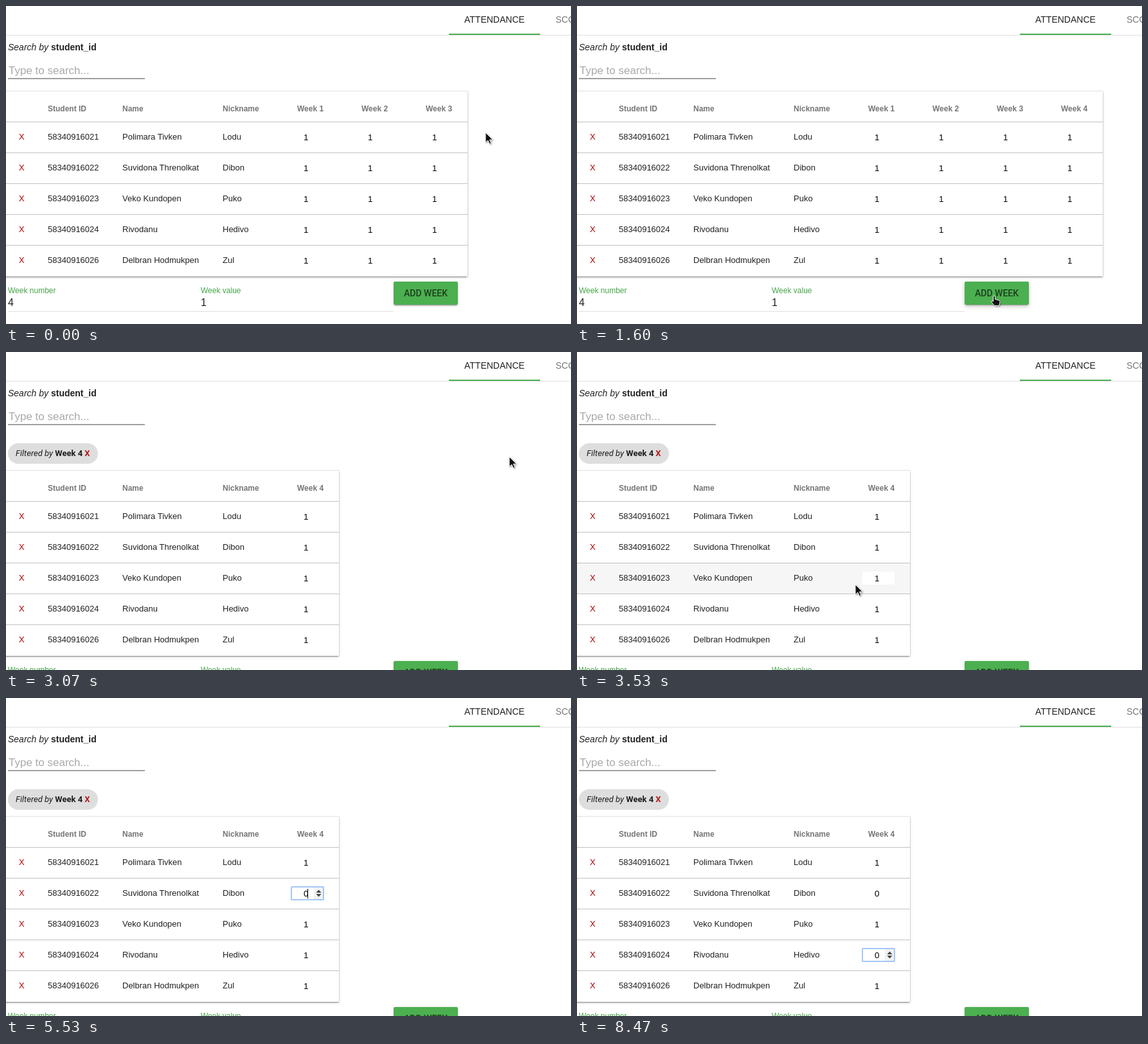
Write an HTML page that moves like this. It is 879x495 px and loops after 8.74 s.

```html
<!DOCTYPE html>
<html>
<head>
<meta charset="utf-8">
<title>Attendance</title>
<style>
html, body { margin: 0; height: 100%; overflow: hidden; background: #fff; }
#stage { position: relative; width: 100%; height: 100%; overflow: hidden; contain: strict; }
#card, #button, svg { position: absolute; }
#card {
  left: -10px; height: 288px; background: #fff;
  box-shadow: 0 0 0 1px rgba(0,0,0,.08), 0 3px 1px -2px rgba(0,0,0,.2),
    0 2px 2px rgba(0,0,0,.14), 0 1px 5px rgba(0,0,0,.12);
}
#button { left: 603px; width: 100px; height: 36px; border-radius: 2px; background: #4caf50; }
svg { left: 0; top: 0; font-family: "Liberation Sans", Arial, sans-serif; fill: rgba(0,0,0,.87); }
.tab { font-size: 14px; }
.muted { fill: rgba(0,0,0,.54); }
.hint { font-size: 17px; fill: #a9a9a9; }
.head { font-size: 12px; font-weight: bold; fill: #757575; }
.cell { font-size: 13px; }
.cross { font-size: 13px; fill: #b00000; }
.value { font-size: 13.33px; fill: #000; }
.picked { font-size: 13.33px; fill: #fff; }
.label { font-size: 12px; fill: #43a547; }
.field { font-size: 16px; }
.action { font: 500 14px Roboto, sans-serif; fill: rgba(0,0,0,.64); }
.chip { font: 13px Roboto, sans-serif; }
.i { font-style: italic; }
.b { font-weight: bold; }
.cursor { filter: drop-shadow(1px 1px 1px rgba(0,0,0,.4)); }
</style>
</head>
<body>
<div id="stage">
  <div id="card"></div>
  <div id="button"></div>
  <svg id="view" width="879" height="495"></svg>
</div>
<script>
const LOOP = 8740, PRESSED = 1470, ADDED = 1600, FILTERED = 3070, HIDDEN = 4660;
const FADE = 300, BLINK = 600;

const columns = { 'Student ID': 65, 'Name': 181, 'Nickname': 337 };
const students = [
  ['58340916021', 'Polimara Tivken', 'Lodu'],
  ['58340916022', 'Suvidona Threnolkat', 'Dibon'],
  ['58340916023', 'Veko Kundopen', 'Puko'],
  ['58340916024', 'Rivodanu', 'Hedivo'],
  ['58340916026', 'Delbran Hodmukpen', 'Zul']
];

// Pointer moves: each bends from the previous end, past a control point, to its own end.
const home = [746, 197];
const moves = [
  { start: 200, end: 930, via: [815, 340], to: [649, 451] },   // add button
  { start: 1870, end: 2470, via: [915, 480], to: [832, 145] }, // around the table
  { start: 2470, end: 2730, via: [800, 141], to: [788, 157] }, // last heading
  { start: 3030, end: 3530, via: [640, 340], to: [433, 362] }, // third row
  { start: 3530, end: 4000, via: [425, 330], to: [459, 248] }, // first value
  { start: 4330, end: 4640, via: [550, 230], to: [638, 219] }  // away
];

// Each student in turn gets the focus; some values are overwritten with 0.
const edits = [{ at: 4200 }, { at: 4670, typed: 5530 }, { at: 6200 }, { at: 6730, typed: 7870 }];

const clamp = v => Math.max(0, Math.min(1, v));
const smooth = v => v * v * (3 - 2 * v);
const within = (v, a, size) => v >= a && v < a + size;
const text = (x, y, cls, s) => `<text x="${x}" y="${y}" class="${cls}">${s}</text>`;
const rect = (x, y, w, h, fill, more = '') =>
  `<rect x="${x}" y="${y}" width="${w}" height="${h}" fill="${fill}" ${more}/>`;
const span = (cls, s, more = '') => `<tspan class="${cls}" ${more}>${s}</tspan>`;

function layout(t) {
  const filtered = t >= FILTERED;
  const weeks = filtered ? [4] : t >= ADDED ? [1, 2, 3, 4] : [1, 2, 3];
  const shift = filtered ? 52 : 0;
  return { filtered, weeks, shift, top: 133 + shift, right: 418 + 100 * weeks.length };
}

function pointer(t) {
  t = Math.floor((t + 4) * .015) / .015; // 15 positions a second
  let from = home;
  for (const { start, end, via, to } of moves) {
    if (t < start) break;
    const f = smooth(clamp((t - start) / (end - start)));
    const bend = i => (1 - f) ** 2 * from[i] + 2 * f * (1 - f) * via[i] + f * f * to[i];
    if (t < end) return [Math.round(bend(0)), Math.round(bend(1))];
    from = to;
  }
  return from;
}

// Table row under the pointer; -1 is the heading
function hovered(t) {
  const { top, right } = layout(t);
  const [x, y] = pointer(t);
  return x < right && y >= top ? Math.floor((y - top - 47) / 48) : null;
}

// The row shade follows the share of recent time spent on that row
function shade(row, t) {
  let hits = 0;
  for (let i = 0; i < 12; i++) hits += hovered(t - i * FADE / 12) === row;
  return hits / 12;
}

function overInput(t) {
  const { top, filtered } = layout(t);
  const [x, y] = pointer(t);
  const row = hovered(t);
  return filtered && row >= 0 && within(x, 444, 50) && within(y, top + 61 + 48 * row, 20);
}

function cursor(t) {
  if (t >= HIDDEN) return '';
  const [x, y] = pointer(t);
  const open = `<g class="cursor" transform="translate(${x} ${y})">`;
  if (overInput(t)) {
    const beam = 'M-3-6.5h2.5l.5 1l.5-1h2.5M-3 7.5h2.5l.5-1l.5 1h2.5M0-6v13';
    return `${open}<path d="${beam}" fill="none" stroke="#fff" stroke-width="2.4"/>
      <path d="${beam}" fill="none" stroke="#000"/></g>`;
  }
  const onButton = within(x, 603, 100) && within(y, 429 + layout(t).shift, 36);
  const shape = onButton || hovered(t) === -1
    ? 'M-1.5 1Q0-1 1.5 1V5.5L7.5 7Q9.5 8 9 11L7.5 15.5H.5L-4 10Q-5 7.5-2.5 8L-1.5 9Z'
    : 'M0 0V15.5L3.8 12.2L6.2 17.8L8.8 16.6L6.4 11.2H11.3Z';
  return `${open}<path d="${shape}" fill="#111" stroke="#fff"/></g>`;
}

function input(x, y, row, t) {
  const { at, typed } = edits[row] || {};
  const next = edits[row + 1];
  const focused = t >= at && t < (next ? next.at : LOOP);
  const zero = t >= typed;
  const clicked = row === 0; // the others are reached by key, which selects the value
  const selected = focused && !clicked && !zero;
  const caret = focused && !selected && (clicked || t < typed + BLINK);

  let s = rect(x, y, 50, 20, '#fff', focused ? 'stroke="#a5c6f8" stroke-width="2" rx="1"' : '');
  if (focused || overInput(t) && hovered(t) === row) {
    s += rect(x + 35, y + 1, 14, 18, '#f1f1f1');
    s += `<path d="M${x + 38.5} ${y + 9}h8l-4-4.5zM${x + 38.5} ${y + 11}h8l-4 4.5z" fill="#444"/>`;
  }
  if (selected) s += rect(x + 19, y + 3, 7, 15, '#3390ff');
  s += text(x + 19, y + 15, selected ? 'picked' : 'value', zero ? 0 : 1);
  if (caret) s += rect(x + (clicked ? 18 : 25), y + 3, 1, 15, '#000');
  return s;
}

function table(t, { top, weeks, right }) {
  const lefts = Object.values(columns);
  let s = '';
  Object.keys(columns).forEach((h, i) => s += text(lefts[i], top + 31, 'head', h));
  weeks.forEach((w, i) => s += text(453 + 100 * i, top + 31, 'head', 'Week ' + w));
  students.forEach((cells, row) => {
    const y = top + 47 + 48 * row;
    s += rect(0, y, right, 48, '#eee', `opacity="${shade(row, t)}"`);
    s += rect(0, y, right, 1, '#c2c2c2') + text(20, y + 28, 'cross', 'X');
    cells.forEach((c, i) => s += text(lefts[i], y + 28, 'cell', c));
    weeks.forEach((w, i) => s += input(444 + 100 * i, y + 14, row, t));
  });
  return s;
}

function page() {
  return rect(0, 45, 879, 1, '#e0e0e0') + rect(689, 43, 142, 2, '#4caf50') +
    text(713, 26, 'tab', 'ATTENDANCE') + text(855, 26, 'tab muted', 'SCORE') +
    text(3, 69, 'tab', span('i', 'Search by ') + span('b', 'student_id')) +
    text(4, 106, 'hint', 'Type to search...') + rect(3, 112, 213, 2, '#a0a0a0');
}

function chip() {
  return rect(3, 142, 140, 32, '#dedede', 'rx="16"') +
    text(15, 162, 'chip', span('i', 'Filtered by ') + span('b', 'Week 4 ') + span('b', 'X', 'fill="#b71c1c"'));
}

function form(shift) {
  return text(3, 447 + shift, 'label', 'Week number') + text(3, 467 + shift, 'field', 4) +
    text(303, 447 + shift, 'label', 'Week value') + text(303, 467 + shift, 'field', 1) +
    rect(3, 475 + shift, 600, 1, '#e0e0e0') +
    `<text x="653" y="${452 + shift}" class="action" text-anchor="middle">ADD WEEK</text>`;
}

const [card, button, view] = ['card', 'button', 'view'].map(id => document.getElementById(id));
let last = '';

function draw(now) {
  const t = now % LOOP;
  const now_ = layout(t);
  const lift = Math.sin(Math.PI * clamp((t - PRESSED) / 260));

  card.style.top = now_.top + 'px';
  card.style.width = now_.right + 10 + 'px';
  button.style.top = 429 + now_.shift + 'px';
  button.style.boxShadow = `0 3px 1px -2px rgba(0,0,0,.2), 0 2px ${2 + 3 * lift}px rgba(0,0,0,.14),
    0 ${1 + 2 * lift}px ${5 + 3 * lift}px rgba(0,0,0,.12)`;

  const markup = page() + (now_.filtered ? chip() : '') +
    table(t, now_) + form(now_.shift) + cursor(t);
  if (markup !== last) view.innerHTML = last = markup;
  requestAnimationFrame(draw);
}
requestAnimationFrame(draw);
</script>
</body>
</html>
```
